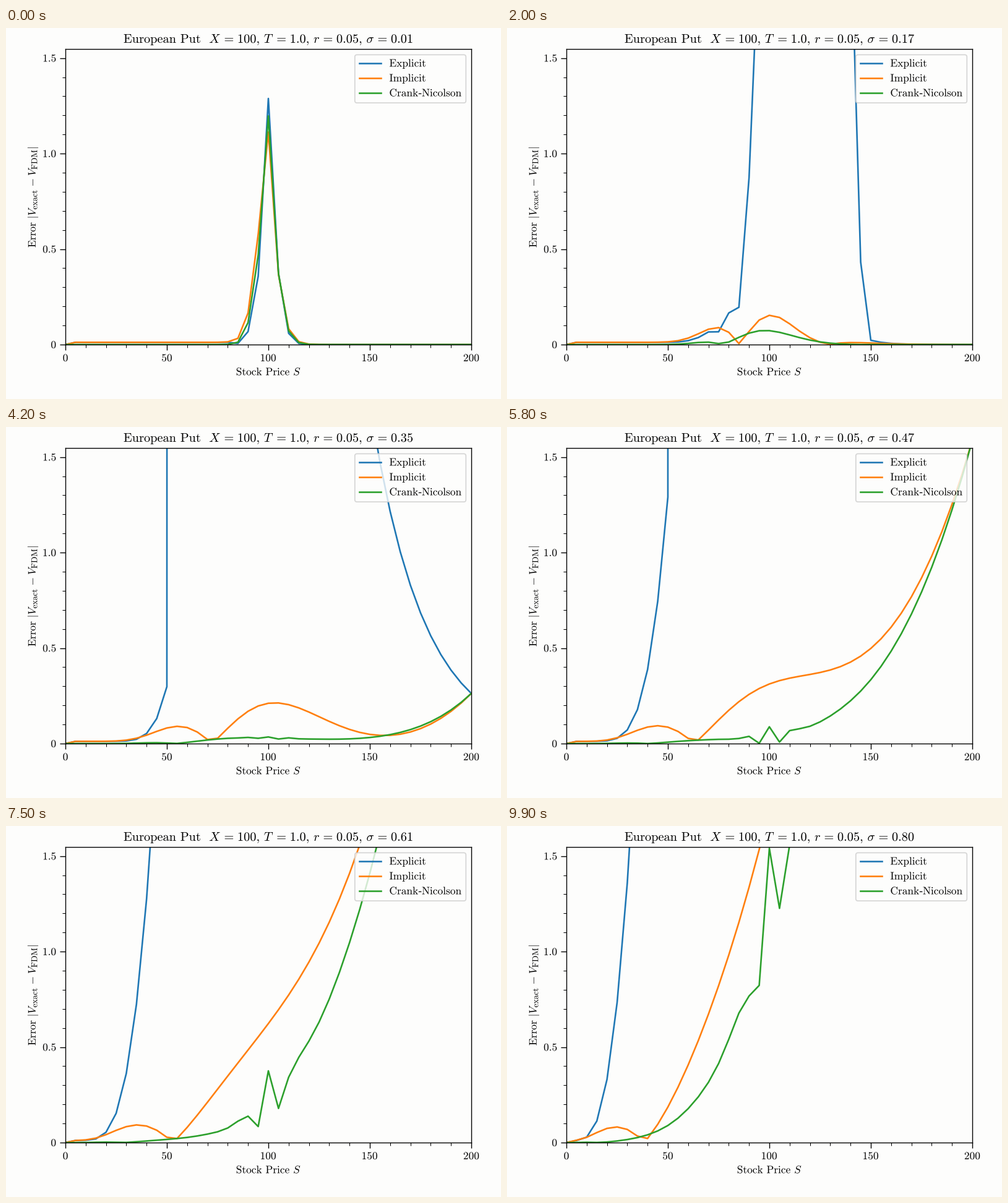
Write a matplotlib script that moves like this. It is 800 px wide and 600 px high and loops after 10000 ms.

```python
import math

import numpy as np
import matplotlib.pyplot as plt
from matplotlib.animation import FuncAnimation
from matplotlib.patches import FancyBboxPatch, PathPatch
from matplotlib.textpath import TextPath
from matplotlib.ticker import MultipleLocator
from matplotlib.transforms import Affine2D

W, H, DPI = 800, 600, 125
FRAMES, INTERVAL = 100, 100
EM = 10 * DPI / 72  # 10 pt text in pixels

K, T, R = 100.0, 1.0, 0.05
S_MAX, CELLS, STEPS = 200.0, 40, 10
DT = T / STEPS
S = np.linspace(0, S_MAX, CELLS + 1)
SIGMAS = np.linspace(0.01, 0.8, FRAMES)

# label, colour, weight of the new time level
SCHEMES = [
    ("$\\mathrm{Explicit}$", "tab:blue", 0.0),
    ("$\\mathrm{Implicit}$", "tab:orange", 1.0),
    ("$\\mathrm{Crank}$-$\\mathrm{Nicolson}$", "tab:green", 0.5),
]

norm_cdf = np.vectorize(lambda x: 0.5 * math.erfc(-x / math.sqrt(2)))


def exact_put(sigma):
    s = np.maximum(S, 1e-9)
    vol = sigma * math.sqrt(T)
    d1 = (np.log(s / K) + (R + sigma**2 / 2) * T) / vol
    return K * math.exp(-R * T) * norm_cdf(vol - d1) - s * norm_cdf(-d1)


def fdm_put(sigma, theta):
    """Theta scheme on a uniform price grid with fixed end values."""
    i = np.arange(CELLS + 1)
    var = (sigma * i) ** 2
    op = np.diag(-(var + R))
    op += np.diag(((var + R * i) / 2)[:-1], 1)
    op += np.diag(((var - R * i) / 2)[1:], -1)
    op[[0, -1]] = 0
    eye = np.eye(CELLS + 1)
    new, old = eye - theta * DT * op, eye + (1 - theta) * DT * op
    v = np.maximum(K - S, 0)
    for n in range(1, STEPS + 1):
        rhs = old @ v
        rhs[0], rhs[-1] = K * math.exp(-R * n * DT), 0
        v = np.linalg.solve(new, rhs)
    return v


def errors(sigma):
    exact = exact_put(sigma)
    return [np.abs(exact - fdm_put(sigma, theta)) for _, _, theta in SCHEMES]


ERRORS = [errors(sigma) for sigma in SIGMAS]
Y_MAX = 1.2 * ERRORS[0][0].max()

plt.rcParams.update({"mathtext.fontset": "cm", "font.family": "Liberation Serif"})
BG = "#fdfdfc"
fig = plt.figure(figsize=(W / DPI, H / DPI), dpi=DPI, facecolor=BG)

# Plot area
left, right, top, bottom = 96, 752, 34.4, 512
ax = fig.add_axes([left / W, 1 - bottom / H, (right - left) / W, (bottom - top) / H],
                  facecolor=BG)
ax.set(xlim=(0, S_MAX), ylim=(0, Y_MAX))
for axis, major in ((ax.xaxis, 50), (ax.yaxis, 0.5)):
    axis.set_major_locator(MultipleLocator(major))
    axis.set_minor_locator(MultipleLocator(major / 5))
ax.tick_params(which="major", length=5, width=0.8, labelbottom=False, labelleft=False)
ax.tick_params(which="minor", length=3, width=0.6)
curves = [ax.plot(S, S * 0, color=c, lw=1.5)[0] for _, c, _ in SCHEMES]

# Pixel-space layer for text and legend
page = fig.add_axes([0, 0, 1, 1], zorder=5)
page.set(xlim=(0, W), ylim=(H, 0))
page.axis("off")


def glyphs(s, size=EM):
    return TextPath((0, 0), s, size=size)


def label(x, y, s, size=EM, align=None, turn=0):
    """Text as outlines, y on the baseline; align is the ink share left of x."""
    path = glyphs(s, size)
    if align is not None:
        box = path.get_extents()
        x -= box.x0 + align * box.width
    place = Affine2D().rotate_deg(turn).scale(1, -1).translate(x, y)
    patch = PathPatch(path, facecolor="black", lw=0, snap=False, zorder=6,
                      transform=place + page.transData)
    return page.add_artist(patch)


def rm(s):
    return rf"$\mathrm{{{s}}}$"


GAP = r"\hspace{0.38}"  # one word space


def equation(symbol, value, italic=0.0):
    return (rf"{symbol}\hspace{{{0.116 + italic:.3f}}}="
            rf"\hspace{{0.116}}\mathrm{{{value}}}")


def title_path(sigma):
    parts = [
        equation("X", "100", 0.09),
        equation("T", "1.0", 0.158),
        equation("r", "0.05", 0.03),
        equation(r"\sigma", f"{sigma:.2f}", 0.04),
    ]
    head = rf"\mathrm{{European}}{GAP}\mathrm{{Put}}{GAP}{GAP}"
    return "$" + head + ("{,}" + GAP).join(parts) + "$"


TITLE_EM = 20.35
title = label(189.9, 24, title_path(SIGMAS[0]), TITLE_EM)

for k in range(5):
    label(left + 164 * k, 539, rm(50 * k), align=0.5)
for k, s in enumerate(("0", "0.5", "1.0", "1.5")):
    label(80.4, bottom - 0.5 * k * (bottom - top) / Y_MAX + 5.8, rm(s), align=1)

label((left + right) / 2, 561.5, rf"$\mathrm{{Stock}}{GAP}\mathrm{{Price}}{GAP}S$",
      align=0.5)

# Vertical label: baseline drop, start, text, size
SUB = 13.7
for drop, y, s, size in (
    (0, 355.1, rm("Error"), EM),
    (0, 308.4, "$|$", EM),
    (0, 303.6, "$V$", EM),
    (2.6, 293.5, rm("exact"), SUB),
    (0, 256.5, "$-$", EM),
    (0, 239.1, "$V$", EM),
    (2.6, 229.0, rm("FDM"), SUB),
    (0, 196.2, "$|$", EM),
):
    label(47.8 + drop, y, s, size, turn=90)

# Legend
page.add_patch(FancyBboxPatch(
    (563.8, 43.3), 179.5, 77.8, boxstyle=f"round,pad=0,rounding_size={0.2 * EM}",
    facecolor=BG, edgecolor="0.8", alpha=0.8, lw=1))
for k, (name, color, _) in enumerate(SCHEMES):
    y = 57 + 24 * k
    page.plot([571, 606], [y, y], color=color, lw=1.5, solid_capstyle="projecting")
    label(619.4, y + 5.5, name)


def update(n):
    title.set_path(glyphs(title_path(SIGMAS[n]), TITLE_EM))
    for curve, err in zip(curves, ERRORS[n]):
        curve.set_ydata(err)
    return [title, *curves]


anim = FuncAnimation(fig, update, frames=FRAMES, interval=INTERVAL,
                     repeat=True, repeat_delay=0, blit=False)
plt.show()
```
